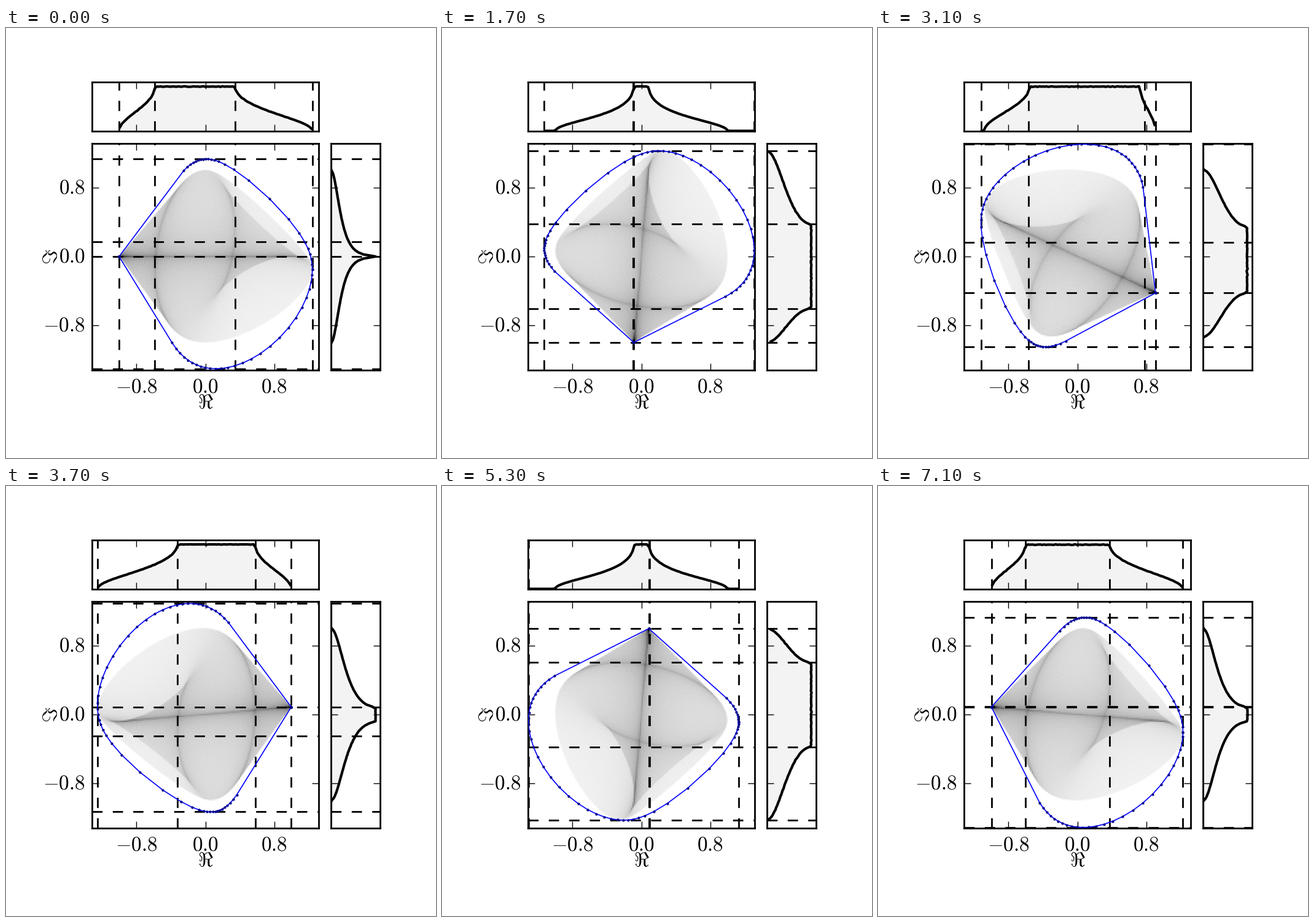
Recreate the animation shown at these times as a matplotlib script. Size 700 px wide and 700 px high, loop 7.2 s.

```python
import numpy as np
import matplotlib.pyplot as plt
from matplotlib.animation import FuncAnimation

plt.rcParams.update({
    "mathtext.fontset": "cm",
    "font.size": 12,
    "axes.linewidth": 1,
    "axes.axisbelow": False,
})

SIZE, DPI = 700, 200
FRAMES, INTERVAL = 72, 100
LIM = 184.5 / 140.4        # half width of the main plot in data units
BINS, SUB = 185, 5         # density bins shown, finer cells per bin
FINE = BINS * SUB
CELL = 2 * LIM / FINE
DENSITY_MAX = 2.1
TICKS = [-0.8, 0.0, 0.8]

A = np.array([[1, 0, 0, 1],
              [0, 1j, 0, 1],
              [0, 0, -1, 0],
              [0, 0, 0, -1j]])


def hermitian(m):
    return (m + np.conj(np.swapaxes(m, -1, -2))) / 2


def sample_shadow(chunks=3, size=2_000_000):
    """Histogram of x^T A x for real unit vectors x, spread evenly."""
    counts = np.zeros(FINE * FINE)
    for c in range(chunks):
        n = np.arange(c * size, (c + 1) * size)
        u = (0.5 + n * 0.8191725134) % 1
        a = np.pi * ((0.5 + n * 0.6710436067) % 1)
        b = 2 * np.pi * ((0.5 + n * 0.5497004779) % 1)
        p, q = np.sqrt(1 - u), np.sqrt(u)
        x1, x2 = p * np.cos(a), p * np.sin(a)
        x3, x4 = q * np.cos(b), q * np.sin(b)
        re = x1 * x1 - x3 * x3 + (x1 + x2) * x4
        im = x2 * x2 - x4 * x4
        ix = ((re + LIM) / CELL).astype(int)
        iy = ((im + LIM) / CELL).astype(int)
        counts += np.bincount(iy * FINE + ix, minlength=FINE * FINE)
    return counts.reshape(FINE, FINE) / (chunks * size)


def box_sum(h):
    half = SUB // 2
    for axis in (0, 1):
        h = sum(np.roll(h, k, axis) for k in range(-half, half + 1))
    return h


shadow = sample_shadow()
density = box_sum(shadow) / (SUB * CELL) ** 2

rng = np.random.default_rng(1)
rows, cols = np.nonzero(shadow)
weights = shadow[rows, cols]
points = ((cols + rng.random(cols.size)) * CELL - LIM
          + 1j * ((rows + rng.random(rows.size)) * CELL - LIM))

mid = (np.arange(BINS) + 0.5) * SUB * CELL - LIM
grid = mid[None, :] + 1j * mid[:, None]
normals = np.arange(0, 2 * np.pi, 0.1)


def rotated_density(turn):
    z = grid / turn
    ix = np.clip(((z.real + LIM) / CELL).astype(int), 0, FINE - 1)
    iy = np.clip(((z.imag + LIM) / CELL).astype(int), 0, FINE - 1)
    return density[iy, ix]


def range_boundary(m):
    h = hermitian(np.exp(-1j * normals)[:, None, None] * m)
    v = np.linalg.eigh(h)[1][:, :, -1]
    z = np.einsum("ki,ij,kj->k", v.conj(), m, v)
    return np.append(z, z[0])


def marginal(values, lo, hi, n=100):
    step = (hi - lo) / n
    i = np.clip(((values - lo) / step).astype(int), 0, n - 1)
    f = np.bincount(i, weights, minlength=n)
    return lo + (np.arange(n) + 0.5) * step, f / f.max()


fig = plt.figure(figsize=(SIZE / DPI, SIZE / DPI), dpi=DPI, facecolor="white")


def add_axes(left, top, width, height):
    ax = fig.add_axes([left / SIZE, 1 - (top + height) / SIZE,
                       width / SIZE, height / SIZE])
    ax.tick_params(direction="in", length=4, width=0.5, pad=4,
                   top=True, right=True)
    return ax


main = add_axes(140, 187.5, 369, 369)
top = add_axes(140, 87.5, 369, 80)
side = add_axes(529, 187.5, 80, 369)

labels = [f"${t:.1f}$" for t in TICKS]
image = main.imshow(np.zeros((BINS, BINS)), cmap="gray_r", vmin=0,
                    vmax=DENSITY_MAX, origin="lower", aspect="auto",
                    interpolation="nearest", extent=[-LIM, LIM, -LIM, LIM])
main.set_xticks(TICKS, labels)
main.set_yticks(TICKS, labels)
for t in main.get_yticklabels():
    t.set_va("center")
top.set_xticks(TICKS, [""] * 3)
top.set_yticks([])
side.set_yticks(TICKS, [""] * 3)
side.set_xticks([])
main.set(xlim=(-LIM, LIM), ylim=(-LIM, LIM))
top.set(xlim=(-LIM, LIM), ylim=(0, 1.1))
side.set(xlim=(0, 1.1), ylim=(-LIM, LIM))

fig.text(325 / SIZE, 1 - 609 / SIZE, r"$\Re$", ha="center", va="center")
fig.text(73 / SIZE, 1 - 372 / SIZE, r"$\Im$", ha="center", va="center",
         rotation=90)

dash = dict(color="black", lw=1, ls=(0, (6, 6)), dash_capstyle="butt")
v_lines = [[ax.axvline(0, **dash) for ax in (main, top)] for _ in range(4)]
h_lines = [[ax.axhline(0, **dash) for ax in (main, side)] for _ in range(4)]

outline, = main.plot([], [], color="blue", lw=0.6, marker="o", ms=1.4,
                     mfc="#00008b", mec="#00008b", mew=0.1, zorder=3)


def add_marginal(ax):
    fill = ax.fill([0, 0, 0], [0, 0, 0], color="0.953", lw=0, zorder=1)[0]
    curve, = ax.plot([], [], color="black", lw=1.5, zorder=3)
    return fill, curve


top_fill, top_curve = add_marginal(top)
side_fill, side_curve = add_marginal(side)


def closed_area(pos, f):
    pos = np.concatenate([pos[:1], pos, pos[-1:]])
    return pos, np.concatenate([[0], f, [0]])


def update(i):
    turn = np.exp(2j * np.pi * i / FRAMES)
    m = turn * A
    image.set_data(rotated_density(turn))

    z = range_boundary(m)
    outline.set_data(z.real, z.imag)

    re_eig = np.linalg.eigvalsh(hermitian(m))
    im_eig = np.linalg.eigvalsh(hermitian(-1j * m))
    for pair, e in zip(v_lines, re_eig):
        for line in pair:
            line.set_xdata([e, e])
    for pair, e in zip(h_lines, im_eig):
        for line in pair:
            line.set_ydata([e, e])

    w = points * turn
    pos, f = marginal(w.real, re_eig[0], re_eig[-1])
    top_curve.set_data(pos, f)
    top_fill.set_xy(np.column_stack(closed_area(pos, f)))
    pos, f = marginal(w.imag, im_eig[0], im_eig[-1])
    side_curve.set_data(f, pos)
    side_fill.set_xy(np.column_stack(closed_area(pos, f)[::-1]))
    return []


anim = FuncAnimation(fig, update, frames=FRAMES, interval=INTERVAL,
                     repeat=True, repeat_delay=0)
plt.show()
```
